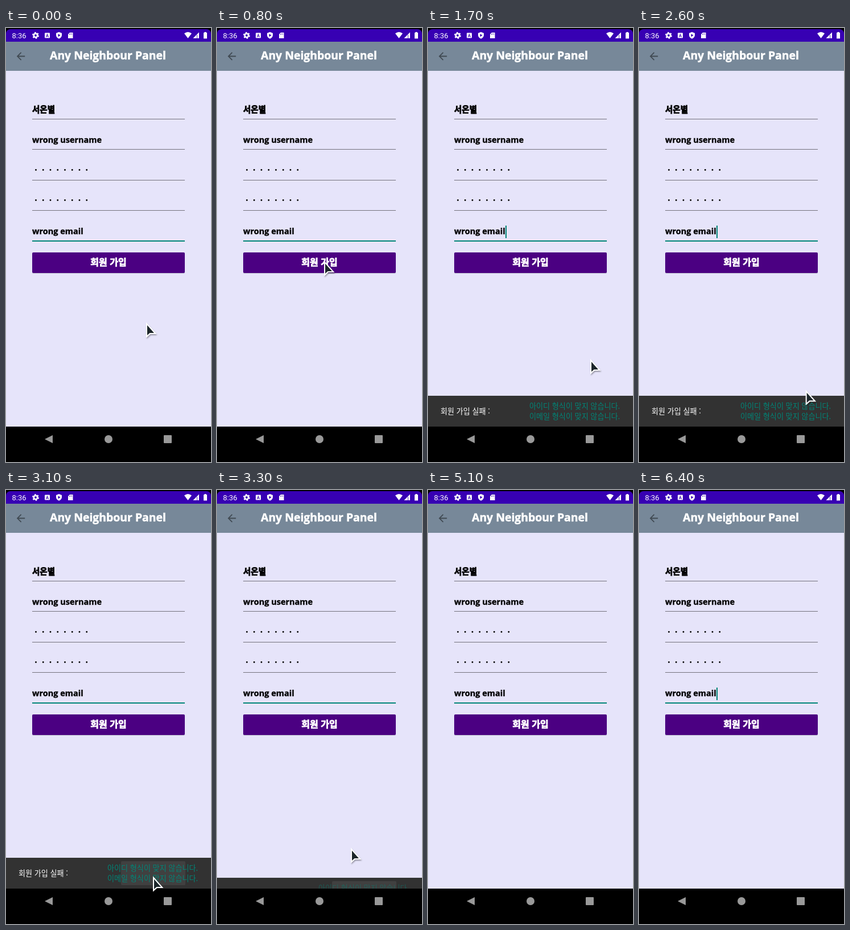
An HTML page for the animation above (6600 ms loop, 360 by 760 pixels).

```html
<!DOCTYPE html>
<html lang="ko">
<head>
<meta charset="utf-8">
<title>Sign-up form</title>
<style>
  html, body { margin: 0; width: 100%; height: 100%; overflow: hidden; background: #000; }
  svg { display: block; width: 100%; height: 100%; }
  text { white-space: pre; }
  .bold { font: 700 14.5px "Open Sans", sans-serif; stroke: #000; stroke-width: .35px; }
  .title { font-size: 19.4px; fill: #fff; stroke: #fff; stroke-width: .5px; }
  .ko { font: 900 14.5px "Noto Sans CJK KR", "Noto Sans CJK", sans-serif; stroke: #000; stroke-width: .8px; }
  .button { font-size: 16px; fill: #fff; stroke: #fff; text-anchor: middle; }
  .clock { font: 400 13px Roboto, sans-serif; fill: #fff; }
  .snack { font: 400 13.1px "Noto Sans CJK KR", "Noto Sans CJK", sans-serif; fill: #fff; }
  .action { fill: #008577; }
</style>
</head>
<body>
<svg viewBox="0 0 360 760">
  <defs>
    <clipPath id="content"><rect y="75" width="360" height="623"/></clipPath>
    <filter id="soft" x="-40%" y="-30%" width="200%" height="180%">
      <feDropShadow dx="1" dy="2" stdDeviation="1.2" flood-opacity=".35"/>
    </filter>
  </defs>

  <rect width="360" height="760"/>
  <path d="M0 24V10a8 8 0 0 1 8-8H352a8 8 0 0 1 8 8V24z" fill="#3700b3"/>
  <rect y="24" width="360" height="51" fill="#778899"/>
  <rect y="75" width="360" height="623" fill="#e6e4fa"/>

  <!-- status bar -->
  <text class="clock" x="10.5" y="18">8:36</text>
  <g fill="#fff">
    <circle cx="52" cy="13" r="3.2" fill="none" stroke="#fff" stroke-width="2.6"/>
    <circle cx="52" cy="13" r="5" fill="none" stroke="#fff" stroke-width="2" stroke-dasharray="2.6 2.636"/>
    <rect x="68" y="8.5" width="9" height="9" rx="1"/>
    <path d="M93 7l5 2v3.5c0 3-2 5.2-5 6.3c-3-1.1-5-3.3-5-6.3V9z"/>
    <path d="M112 8h5.5v10h-8.5v-7z"/>
    <path d="M313 9.5Q319.500 4.5 326 9.500L319.500 18z"/>
    <path d="M339 7.5V18H328.500z"/>
    <path d="M348.500 7h3v1.200h1.500V18.500h-6V8.200h1.500z"/>
  </g>
  <path d="M70.500 16l2-5.500 2 5.500M71.200 14.300h2.600" fill="none" stroke="#3700b3"/>
  <path d="M91.500 10.200l4 2.600-4 2.600z" fill="#3700b3"/>
  <path d="M335.500 12v6M111.500 10v2M113.500 9.500v2M115.500 9.500v2" stroke="#3700b3" stroke-width=".8"/>

  <!-- app bar -->
  <path transform="translate(15.2 38.7) scale(.9)" fill="#414a53"
    d="M20 11H7.830l5.590-5.590L12 4l-8 8 8 8 1.410-1.410L7.830 13H20z"/>
  <text class="bold title" x="77" y="55">Any Neighbour Panel</text>

  <!-- form -->
  <text class="ko" x="46" y="148">서온별</text>
  <text class="bold" x="46" y="201">wrong username</text>
  <g id="dots"></g>
  <text class="bold" x="46" y="361">wrong email</text>
  <path d="M46 159.500H314M46 212.500H314M46 266.500H314M46 319.500H314" stroke="#74727c"/>
  <rect x="46" y="372" width="268" height="2" fill="#008577"/>
  <rect id="caret" x="136" y="346" width="2" height="22" fill="#008577"/>
  <rect x="46" y="394" width="268" height="36" rx="2" opacity=".2"/>
  <rect id="button" x="46" y="393" width="268" height="36" rx="2"/>
  <text class="ko button" x="180" y="415.500">회원 가입</text>

  <g clip-path="url(#content)">
    <g id="bar">
      <rect y="644" width="360" height="54" fill="#323232"/>
      <rect id="ripple" x="202" y="650" width="113" height="42" rx="2" fill="#fff" opacity=".07"/>
      <g id="message">
        <text class="snack" x="22" y="676">회원 가입 실패 :</text>
        <text class="snack action" x="178" y="666.500">아이디 형식이 맞지 않습니다.</text>
        <text class="snack action" x="178" y="685">이메일 형식이 맞지 않습니다.</text>
      </g>
    </g>
  </g>

  <!-- navigation bar -->
  <g fill="#999">
    <path d="M82 713V727L68 720z"/>
    <circle cx="180" cy="720" r="7"/>
    <rect x="277" y="713" width="14" height="14" rx="1"/>
  </g>

  <path id="pointer" d="M0-.500V17L4.500 13H12z" fill="#1f262b" stroke="#fff"
    stroke-width="4" paint-order="stroke" filter="url(#soft)"/>
</svg>

<script>
const LOOP = 6600, BLINK = 1013, SLIDE = 250, BAR_HEIGHT = 54;
const BAR_IN = 1175, BAR_OUT = 3200;
const el = id => document.getElementById(id);
const show = (id, on) => el(id).style.display = on ? '' : 'none';
const clamp = k => Math.min(1, Math.max(0, k));
const span = (t, from, length) => clamp((t - from) / length);
const slide = k => 1 - (1 - k * k) ** 6;

// the pointer visits the button, drifts down, then dismisses the bar
const origin = { x: 248, y: 521 };
const moves = [
  { from: 200, to: 700, x: 190, y: 413 },
  { from: 1000, to: 1300, x: 254, y: 536 },
  { from: 1300, to: 1700, x: 287, y: 585 },
  { from: 1700, to: 1900, x: 312, y: 618 },
  { from: 2300, to: 2900, x: 260, y: 682 },
  { from: 3100, to: 3500, x: 214, y: 582 }
];

function pointerAt(t) {
  return moves.reduce((p, m) => {
    const k = span(t, m.from, m.to - m.from);
    return { x: p.x + (m.x - p.x) * k, y: p.y + (m.y - p.y) * k };
  }, origin);
}

function step(t) {
  const size = t < 1900 ? 100 : 200;
  return 1900 + Math.floor((t - 1900) / size) * size;
}

function draw(time) {
  const t = step(time);
  const { x, y } = pointerAt(t);
  const shown = slide(span(t, BAR_IN, SLIDE)) - slide(span(t, BAR_OUT, SLIDE));
  const opacity = span(t, BAR_IN + 70, 180) - span(t, BAR_OUT, 180);
  el('pointer').setAttribute('transform', `translate(${x} ${y})`);
  show('pointer', t < 4100);
  el('bar').setAttribute('transform', `translate(0 ${BAR_HEIGHT * (1 - shown)})`);
  el('message').setAttribute('opacity', opacity);
  show('bar', shown > 0);
  show('ripple', t >= 3100);
  show('caret', (time + BLINK - 292) % BLINK < BLINK / 2);
  el('button').setAttribute('fill', t >= 900 && t < 1500 ? '#430071' : '#4b0082');
}

for (const y of [248.5, 301.5])
  for (let i = 0; i < 8; i++)
    el('dots').innerHTML += `<circle cx="${52.5 + i * 12.75}" cy="${y}" r="1.4"/>`;

const start = performance.now();
function tick() {
  draw((performance.now() - start) % LOOP);
  requestAnimationFrame(tick);
}
tick();
</script>
</body>
</html>
```
